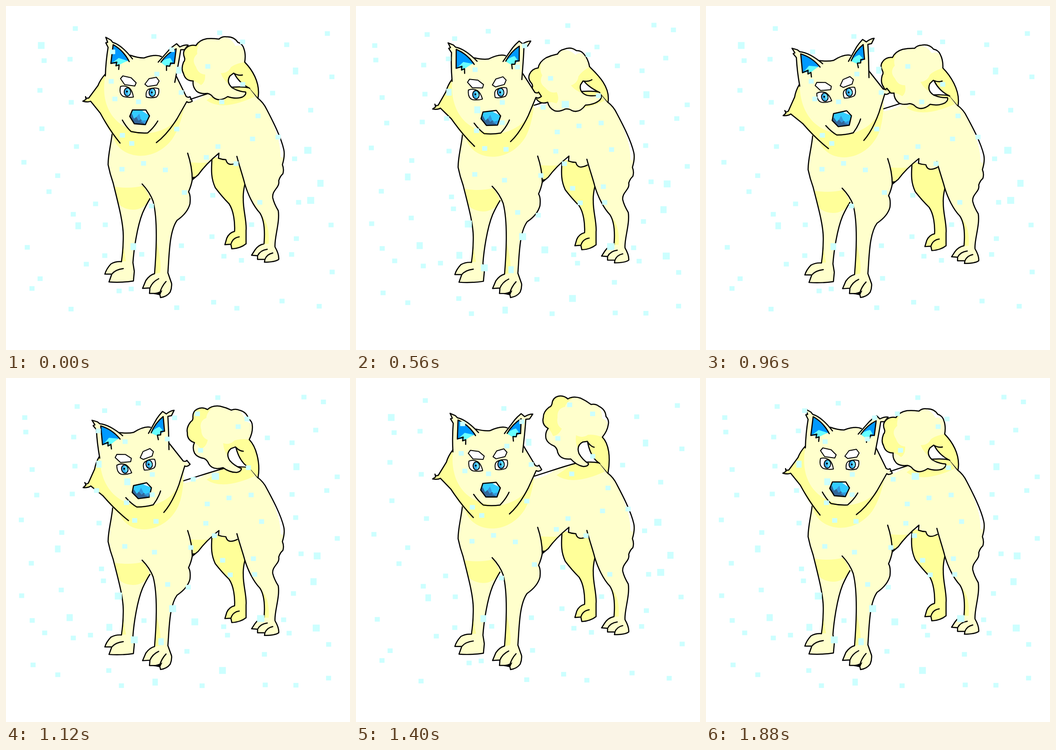
Animation, 748 px wide and 748 px high, one loop 1920 ms. Source, as an HTML page:

```html
<!DOCTYPE html>
<html lang="en">
<head>
<meta charset="utf-8">
<title>Dog in the snow</title>
<style>
  html, body { margin: 0; width: 100%; height: 100%; overflow: hidden; background: #fff; }
  svg { display: block; width: 100vw; height: 100vh; }
  .line { fill: none; stroke: #000; stroke-width: 2.5; stroke-linecap: round; stroke-linejoin: round; }
  .light { fill: #ffffcc; }
  .shade { fill: #ffff99; }
  .white { fill: #fff; }
  .ink { stroke: #000; stroke-width: 2; stroke-linejoin: round; }
</style>
</head>
<body>
<svg viewBox="0 0 748 748">
  <defs>
    <path id="cloud" d="M519 122Q522 105 517 92Q514 82 504 79Q496 66 479 67Q470 66 463 72Q450 70 437 71Q420 74 413 86Q400 83 391 92Q383 100 388 112Q390 118 386 122Q380 137 386 147Q390 163 407 163Q405 175 414 185Q422 192 438 190Q446 192 450 198Q463 210 482 197Q500 203 514 198Q523 193 521 187Q505 186 492 178Q478 166 487 152L495 146Q505 152 514 150"/>
  </defs>
  <g id="body">
    <!-- far hind leg -->
    <path class="shade" d="M448 328C446 360 446 375 455 395Q470 415 485 430C495 445 498 470 497 490Q485 493 480 505L476 519L490 518L491 528Q510 527 522 517V488C524 470 515 440 516 420Q515 405 520 385L503 335Z"/>
    <path class="line" d="M448 330C446 360 446 375 455 395Q470 415 485 430C495 445 498 470 497 490Q485 493 480 505L476 519L489 518Q493 504 507 502M489 518L491 528Q510 527 522 517V488C524 470 515 440 516 420Q515 405 520 385"/>
    <!-- trunk and near legs -->
    <path class="light" d="M232 268C229 300 222 320 222 345Q226 365 233 385C244 430 255 470 255 500Q255 530 251 556Q238 555 228 561Q218 572 215 583L230 583L224 600Q250 602 277 598L279 577L276 558C278 530 285 480 297 450L313 419L320 425C329 460 328 520 323 582Q312 585 304 597L297 614L313 613L312 625L334 625L336 634Q350 632 357 622Q361 612 360 603L352 580C355 540 355 490 372 466Q395 450 400 430Q402 412 397 404Q403 390 405 378L418 367C430 350 445 335 463 320L462 331L478 334Q486 352 503 340C508 350 515 370 519 386C526 410 538 435 552 450Q565 470 561 517Q548 520 541 531L534 542L547 543L547 551L563 551L562 557Q585 557 593 551Q594 540 585 524C583 505 596 470 592 445Q583 430 580 417C578 400 596 395 593 380Q596 370 602 365Q605 355 601 345Q607 325 604 312C598 285 580 250 567 225Q560 210 547 200L530 178Q505 174 480 178C450 186 420 197 395 206L260 230Z"/>
    <path class="white" d="M568 227C580 250 598 285 604 312L602 330L597 328Q598 290 568 227ZM385 208L432 193Q420 206 388 213Z"/>
    <path class="shade" d="M236 393Q270 398 298 391Q308 405 313 419Q300 443 276 443Q255 442 245 430Z"/>
    <path class="shade" d="M402 340Q425 342 442 340L418 367L405 378Z"/>
    <path class="shade" d="M436 205Q470 230 541 197L530 179Q500 174 470 182Z"/>
    <path class="shade" d="M556 456Q574 475 571 517L561 517Q564 475 556 456ZM254 510Q258 540 261 555H251ZM327 510Q339 555 335 580L323 582Z"/>
    <path d="M404 372L413 371L405 380ZM316 625Q330 624 340 618L335 629Z"/>
    <path class="line" d="M232 268C229 300 222 320 222 345Q226 365 233 385C244 430 255 470 255 500Q255 530 251 556Q238 555 228 561Q218 572 215 583L230 583Q238 573 255 571M230 583L224 600Q250 602 277 598L279 577L276 558C278 530 285 480 297 450Q305 432 313 419"/>
    <path class="line" d="M296 387Q313 405 320 425C329 460 328 520 323 582Q312 585 304 597L297 614L313 613Q318 600 332 593M313 613L312 625L334 625Q338 610 348 599M334 625L336 634Q350 632 357 622Q361 612 360 603L352 580C355 540 355 490 372 466Q395 450 400 430Q402 412 397 404Q403 390 405 378L418 367C430 350 445 335 463 320L462 331Q470 334 478 334Q482 351 503 340"/>
    <path class="line" d="M395 320Q405 350 405 378M502 327C508 350 515 370 519 386C526 410 538 435 552 450Q565 470 561 517Q548 520 541 531L534 542L547 543Q553 531 568 529M547 543L547 551L563 551Q567 540 580 537M563 551L562 557Q585 557 593 551Q594 540 585 524C583 505 596 470 592 445Q583 430 580 417C578 400 596 395 593 380Q596 370 602 365Q605 355 601 345Q607 325 604 312C598 285 580 250 567 225Q560 210 547 200L530 178Q505 174 480 178C450 186 420 197 385 208"/>
  </g>

  <path id="rootFill" class="shade"/>
  <path id="rootLine" class="line"/>
  <g id="tail">
    <use href="#cloud" class="light"/>
    <path class="shade" d="M425 74Q413 92 416 104Q402 116 413 132Q418 148 433 149Q434 166 424 172Q414 164 407 163Q390 163 386 147Q380 137 386 122Q390 118 388 112Q383 100 391 92Q400 83 413 86ZM519 122Q500 125 489 133Q483 146 467 146Q473 162 485 170Q480 160 487 152L495 146L514 150Z"/>
    <path class="white" d="M480 68Q496 70 503 80Q512 82 516 91Q507 84 499 87Q494 75 480 68Z"/>
    <use href="#cloud" class="line"/>
  </g>

  <g id="head">
    <path class="light" d="M216 148Q205 160 200 173L181 200L168 207L184 208L205 233Q218 262 233 280L327 297Q350 280 372 245L393 211L405 207L392 197L367 150L338 110Q325 105 300 113L270 107Z"/>
    <path class="shade" d="M217 146Q205 160 200 173L181 200L168 207L184 208L205 233Q218 262 232 280C241 331 318 346 361 290Q380 262 389 212C384 238 360 273 305 277C228 268 203 210 217 146Z"/>
    <g id="leftEar">
      <path class="light" d="M216 152Q217 120 222 90L217 80L221 79L217 68L228 74L232 79Q252 85 272 112L268 124L244 138Z"/>
      <path fill="#0099ff" d="M233 84Q255 96 268 118L246 126L228 125Z"/>
      <path fill="#66ffff" d="M229 125L245 113L264 119L246 128L241 132V123Z"/>
      <path class="line" d="M216 152Q217 120 222 90L217 80L221 79L217 68L228 74L232 79Q252 85 275 115M268 121Q256 97 233 84L228 125L241 122L239 130L246 128L245 138"/>
    </g>
    <path class="light" d="M331 122L355 95Q362 88 371 82L378 89Q388 84 396 85L388 95L380 95Q376 120 367 166L345 145Z"/>
    <path fill="#0099ff" d="M370 93Q350 103 336 122L349 131L366 125Z"/>
    <path fill="#66ffff" d="M336 122Q345 115 357 113L362 121L356 131L349 132Z"/>
    <path class="line" d="M331 122L355 95Q362 88 371 82L378 89Q388 84 396 85L388 95L380 95Q376 120 372 140L367 166M337 122Q350 103 370 93L366 125L358 124L356 131L349 130V140"/>
    <path class="line" d="M270 107Q287 113 300 113Q325 104 338 110M216 148Q205 160 200 173L180 200Q173 202 173 197L174 203L167 207Q178 210 184 207L205 233Q225 270 248 298M370 152L392 197Q398 200 400 197L405 207Q397 212 393 208L372 245Q350 280 327 297"/>
    <path class="white ink" d="M249 158L254 152L272 156L283 167L280 174L258 171ZM302 170L311 158L327 155L333 163L328 172L308 175Z"/>
    <path class="white ink" d="M249 175Q245 192 256 197Q268 200 277 198Q275 184 268 178Q258 172 249 175ZM305 198Q303 185 310 181Q322 176 332 180Q334 192 327 198Q315 201 305 198Z"/>
    <g class="ink" fill="#33aaee">
      <ellipse cx="264" cy="187" rx="7" ry="9"/>
      <ellipse cx="318" cy="188" rx="7" ry="9"/>
    </g>
    <path fill="#66ddff" d="M264 179Q271 181 270 190L265 195ZM318 180Q325 182 324 191L319 196Z"/>
    <circle cx="263" cy="186" r="2"/><circle cx="317" cy="188" r="2"/>
    <path fill="#33ccff" d="M269 240L275 226L304 226L312 239L303 258L279 256Z"/>
    <path fill="#336699" d="M269 240L274 234L278 245L284 241L288 249L293 246L299 253L303 258L279 256Z"/>
    <path fill="#3399dd" d="M284 241L290 234L293 246L288 249ZM292 250L307 248L303 257Z"/>
    <path class="white" d="M296 228L304 227L310 237Z"/>
    <path class="line" d="M269 240L275 226L304 226L312 239L303 258L279 256ZM253 248Q262 264 272 273Q290 277 308 276Q322 264 330 250"/>
  </g>
  <g id="snowA" fill="#ccffff"></g>
  <g id="snowB" fill="#ccffff"></g>
</svg>
<script>
const el = id => document.getElementById(id);
const FRAME = 40, FRAMES = 48;

function seeded(seed) {
  return () => (seed = (seed * 16807) % 2147483647) / 2147483647;
}

// One flake per grid cell, jittered inside it; some are larger clumps.
function makeSnow(group, seed, cols, rows) {
  const random = seeded(seed), cellW = 700 / cols, cellH = 640 / rows;
  let rects = '';
  for (let i = 0; i < cols * rows; i++) {
    const extra = random() < 0.16 ? 5 : 0;
    const w = 11 + extra * random(), h = 10 + extra;
    const x = 26 + (i % cols + random() * 0.85) * cellW;
    const y = 36 + (Math.floor(i / cols) + random() * 0.85) * cellH;
    rects += `<rect x="${x}" y="${y}" width="${w}" height="${h}"/>`;
  }
  group.innerHTML = rects;
}

// Crouch eases in, holds while the tail flicks, then eases back.
const crouchAt = f => f < 19 ? (f / 19) ** 2 : f <= 28 ? 1 : ((47 - f) / 19) ** 2;
const tailAngle = f =>
  f < 19 ? -37 * (f / 19) ** 2 :
  f < 33 ? -37 + 6 * (f - 19) :
  47 * ((47 - f) / 14) ** 3.1;
const earAngle = f => -13 * Math.max(0, 1 - Math.abs(f - 19) / 4);

const pivot = { x: 524, y: 155 };
function onTail(x, y, deg, drop) {
  const a = deg * Math.PI / 180, c = Math.cos(a), s = Math.sin(a);
  const dx = x - pivot.x, dy = y - pivot.y;
  return [pivot.x + dx * c - dy * s, pivot.y + dx * s + dy * c + drop];
}

function draw(f) {
  const crouch = crouchAt(f), angle = tailAngle(f);
  const drop = 17 * crouch, tailDrop = 12 * crouch;

  el('body').setAttribute('transform', `translate(0 630) scale(1 ${1 - 0.0376 * crouch}) translate(0 -630)`);
  el('head').setAttribute('transform', `translate(${-2 * crouch} ${6 * crouch}) rotate(${-12.3 * crouch} 286 207)`);
  el('leftEar').setAttribute('transform', `rotate(${earAngle(f)} 238 138)`);
  el('tail').setAttribute('transform', `translate(0 ${tailDrop}) rotate(${angle} ${pivot.x} ${pivot.y})`);

  // The tail root bridges the fixed rump and the swinging cloud.
  const [ax, ay] = onTail(519, 122, angle, tailDrop);
  const [bx, by] = onTail(497, 148, angle, tailDrop);
  const outer = `M${ax} ${ay}C${ax + 14} ${ay + 14} 554 ${165 + drop} 548 ${200 + drop}`;
  const inner = `530 ${179 + drop}Q${(bx + 518) / 2} ${168 + drop} ${bx} ${by}`;
  el('rootFill').setAttribute('d', `${outer}L${inner}Z`);
  el('rootLine').setAttribute('d', `${outer}M${inner}`);

  const first = Math.floor(f / 4) % 2 === 0;
  el('snowA').style.display = first ? '' : 'none';
  el('snowB').style.display = first ? 'none' : '';
}

makeSnow(el('snowA'), 4711, 9, 9);
makeSnow(el('snowB'), 90210, 10, 10);

const start = performance.now();
function tick() {
  draw(Math.floor((performance.now() - start) / FRAME) % FRAMES);
  requestAnimationFrame(tick);
}
tick();
</script>
</body>
</html>
```
